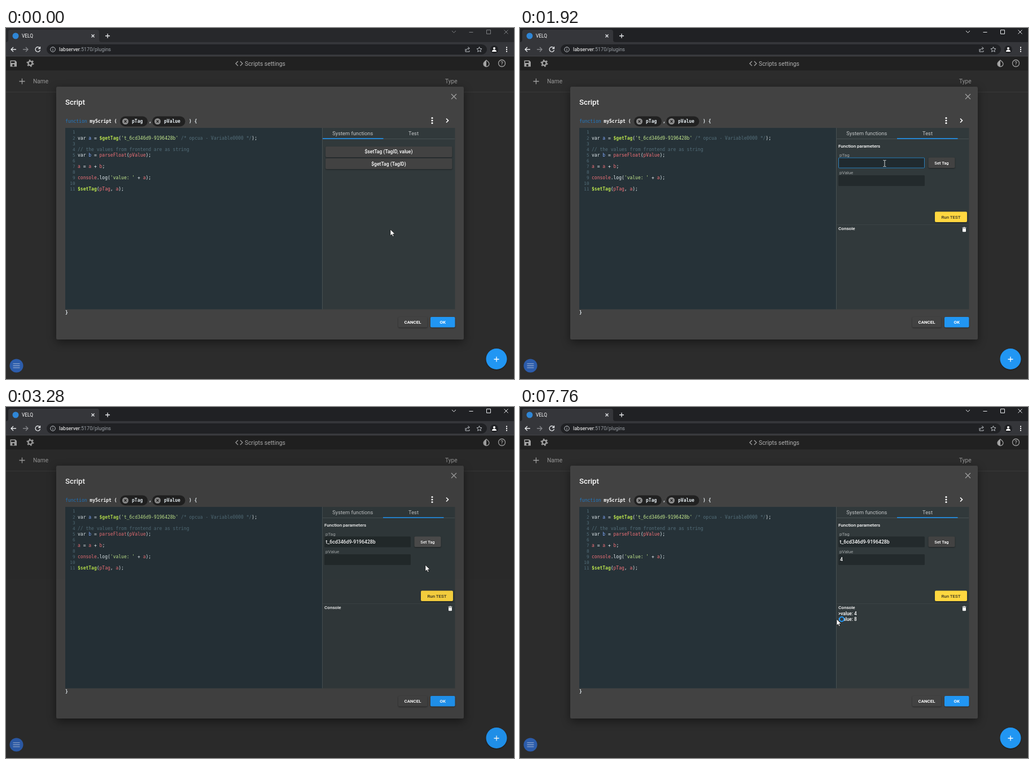
Write an HTML page that moves like this. It is 900x622 px and loops after 8 s.

```html
<!DOCTYPE html>
<html lang="en">
<head>
<meta charset="utf-8">
<title>Script editor</title>
<style>
html, body { margin: 0; width: 100%; height: 100%; overflow: hidden; background: #2c2c2c; }
svg { display: block; width: 900px; height: 622px; font: 8px Roboto, sans-serif; }
text { white-space: pre; fill: #fff; }
.m { font-weight: 500; }
.c { text-anchor: middle; }
.code text, .code { font: 8px "DejaVu Sans Mono", monospace; }
.code text { fill: #e6eef2; }
.num text { fill: #546e7a; text-anchor: end; font-size: 7.6px; }
.b { font-weight: 700; }
.fn { fill: #b9e24d; font-weight: 700; }
.str { fill: #c3e88d; }
.rem { fill: #546e7a; }
.var { fill: #f07178; }
.def { fill: #82aaff; }
.dim { fill: #a4a9aa; }
.ico { fill: none; stroke: #e8eaed; stroke-width: 1.3; }
.gray { stroke: #a0a0a0; }
.lift { filter: drop-shadow(0 1px 1px rgba(0,0,0,.4)); }
.off { opacity: 0; }

/* 1% is one 80 ms step */
.a { animation: 8s step-end -8ms infinite; }
#idle { animation-name: idle; }
#win { animation-name: win; }
#hover { animation-name: hover; }
#ink { animation-name: ink; }
#pages { animation-name: pages; }
#focus1 { animation-name: focus1; }
#focus2 { animation-name: focus2; }
#caret1 { animation-name: caret1; }
#caret2 { animation-name: caret2; }
#tag { animation-name: tag; }
#value { animation-name: value; }
#press1 { animation-name: press1; }
#press2 { animation-name: press2; }
#out1 { animation-name: out1; }
#out2 { animation-name: out2; }
#shade { animation-name: shade; }
#picker { animation-name: picker; transform-origin: 450px 316px; }
#move { animation-name: move; }
#arrow { animation-name: arrow; }
#hand { animation-name: hand; }
#beam { animation-name: beam; }
#busy { animation-name: busy; }

@keyframes idle { 0% { opacity: 1 } 9% { opacity: 0 } }
@keyframes win { 0% { opacity: .45 } 9% { opacity: 1 } }
@keyframes hover { 0% { opacity: 0 } 9% { opacity: .1 } 14% { opacity: 0 } }
@keyframes ink {
  0% { transform: none } 11% { transform: translateX(47px) }
  12% { transform: translateX(95px) } 13% { transform: translateX(107px) }
}
@keyframes pages {
  0% { transform: none } 11% { transform: translateX(-102px) }
  12% { transform: translateX(-209px) } 13% { transform: translateX(-234px) }
}
@keyframes focus1 { 0% { opacity: 0 } 21% { opacity: 1 } 31% { opacity: 0 } }
@keyframes focus2 { 0% { opacity: 0 } 49% { opacity: 1 } 70% { opacity: 0 } }
@keyframes caret1 { 0% { opacity: 0 } 21% { opacity: 1 } 24% { opacity: 0 } 27% { opacity: 1 } 30% { opacity: 0 } }
@keyframes caret2 {
  0% { opacity: 0; transform: none } 49% { opacity: 1 } 52% { opacity: 0 } 55% { opacity: 1 } 58% { opacity: 0 }
  60% { opacity: 1; transform: translateX(5.5px) } 63% { opacity: 0; transform: translateX(5.5px) }
  66% { opacity: 1; transform: translateX(5.5px) } 69% { opacity: 0; transform: none }
}
@keyframes tag { 0% { opacity: 0 } 41% { opacity: 1 } }
@keyframes value { 0% { opacity: 0 } 60% { opacity: 1 } }
@keyframes press1 { 0% { opacity: 0 } 30% { opacity: .05 } 31% { opacity: .1 } 33% { opacity: .06 } 49% { opacity: 0 } }
@keyframes press2 {
  0% { opacity: 0 } 70% { opacity: .06 } 71% { opacity: .1 } 72% { opacity: .05 } 73% { opacity: 0 }
  91% { opacity: .06 } 92% { opacity: .1 } 93% { opacity: .05 } 94% { opacity: 0 }
}
@keyframes out1 { 0% { opacity: 0 } 71% { opacity: 1 } }
@keyframes out2 { 0% { opacity: 0 } 92% { opacity: 1 } }
@keyframes shade {
  0% { opacity: 0 } 32% { opacity: .1 } 33% { opacity: .29 } 34% { opacity: .32 }
  40% { opacity: .28 } 41% { opacity: .05 } 42% { opacity: .01 } 43% { opacity: 0 }
}
@keyframes picker {
  0% { opacity: 0; transform: none } 32% { opacity: .5; transform: none }
  33% { opacity: 1; transform: scale(1.176) } 40% { opacity: .7; transform: scale(1.176) }
  41% { opacity: 0; transform: scale(1.176) }
}
@keyframes move {
  0% { transform: translate(681px, 357px) }
  1% { transform: translate(681px, 357px); animation-timing-function: steps(3) }
  4% { transform: translate(684px, 340px); animation-timing-function: steps(4) }
  8% { transform: translate(728px, 200px); animation-timing-function: steps(2) }
  10% { transform: translate(731px, 183px) }
  13% { transform: translate(731px, 183px); animation-timing-function: steps(3) }
  16% { transform: translate(676px, 235px); animation-timing-function: steps(4) }
  20% { transform: translate(646px, 240px) }
  28% { transform: translate(646px, 240px); animation-timing-function: steps(2) }
  30% { transform: translate(738px, 242px) }
  33% { transform: translate(738px, 242px); animation-timing-function: steps(4) }
  37% { transform: translate(743px, 280px) }
  44% { transform: translate(700px, 279px) }
  45% { transform: translate(649px, 275.5px) }
  47% { transform: translate(648px, 275.5px) }
  50% { transform: translate(643px, 276px) }
  57% { transform: translate(645px, 277px) }
  60% { transform: translate(645px, 278px) }
  63% { transform: translate(645px, 278px); animation-timing-function: steps(5) }
  68% { transform: translate(757px, 334px) }
  80% { transform: translate(663px, 370px); animation-timing-function: steps(3) }
  83% { transform: translate(566px, 369px) }
  85% { transform: translate(566px, 369px); animation-timing-function: steps(4) }
  89% { transform: translate(769px, 329px) }
  94% { transform: translate(769px, 329px); animation-timing-function: steps(3) }
  97%, 100% { transform: translate(561px, 376px) }
}
@keyframes arrow {
  0% { opacity: 1 } 7% { opacity: 0 } 8% { opacity: 1 } 9% { opacity: 0 } 14% { opacity: 1 } 16% { opacity: 0 }
  32% { opacity: 1 } 36% { opacity: 0 } 41% { opacity: 1 } 45% { opacity: 0 } 64% { opacity: 1 } 68% { opacity: 0 }
  80% { opacity: 1 } 89% { opacity: 0 } 95% { opacity: 1 }
}
@keyframes hand {
  0% { opacity: 0 } 7% { opacity: 1 } 8% { opacity: 0 } 9% { opacity: 1 } 14% { opacity: 0 } 30% { opacity: 1 } 32% { opacity: 0 }
  36% { opacity: 1 } 41% { opacity: 0 } 68% { opacity: 1 } 80% { opacity: 0 } 89% { opacity: 1 } 95% { opacity: 0 }
}
@keyframes beam { 0% { opacity: 0 } 16% { opacity: 1 } 30% { opacity: 0 } 45% { opacity: 1 } 64% { opacity: 0 } }
@keyframes busy { 0% { opacity: 0 } 97% { opacity: 1 } }
</style>
</head>
<body>
<svg viewBox="0 0 900 622">
  <defs>
    <clipPath id="side"><path d="M561 197h234v301h-234z"/></clipPath>
  </defs>

  <!-- browser -->
  <rect width="900" height="26" fill="#202124"/>
  <rect id="idle" class="a" width="900" height="26" fill="#27282b"/>
  <path d="M0 25q4 0 4-4V7q0-4 4-4h153q4 0 4 4v14q0 4 4 4h731v25H0z" fill="#35363a"/>
  <rect y="49.5" width="900" height="1" fill="#4a4b4e"/>
  <circle cx="17" cy="14" r="5.5" fill="#2f86d6"/>
  <text x="28" y="17" font-size="8.4">VELQ</text>
  <path class="ico" stroke-width="1.1" d="M151.500 11.500l5 5m0-5l-5 5M176 14h8m-4-4v8"/>
  <g id="win" class="a"><path class="ico" style="stroke-width:1" d="M790 5l3.500 3.500L797 5M820.500 7.500h7M851.500 3.500h7v7h-7zM882.500 3.500l7 7m0-7l-7 7"/></g>
  <rect x="72" y="29" width="780" height="18" rx="9" fill="#202124"/>
  <path class="ico" d="M18 38H9m4-4l-4 4 4 4M60 35.500a4.300 4.300 0 1 0 .5 3.500M60.500 33v3.500H57"/>
  <path class="ico" style="stroke:#85878b" d="M30 38h9m-4-4l4 4-4 4"/>
  <g class="ico" style="stroke:#bdc1c6;stroke-width:1">
    <circle cx="83" cy="38" r="4.300"/>
    <path d="M83 37.500v3M83 35v1M814 37v5h7v-2M815.500 40q0-4 5-4m-2-2.500l2.800 2.500-2.800 2.500M838.500 33.500l1.300 3 3.200.3-2.400 2.200.7 3.200-2.800-1.700-2.800 1.700.7-3.200-2.400-2.200 3.200-.3z"/>
  </g>
  <text x="94" y="41" font-size="9">labserver<tspan fill="#9aa0a6">:5170/plugins</tspan></text>
  <circle cx="865" cy="38" r="7" fill="#202124"/>
  <path fill="#fff" d="M861 42q0-3.500 4-3.500t4 3.500zM863 36a2 2 0 1 1 4 0 2 2 0 1 1-4 0M886 33.500h2v2h-2zM886 37h2v2h-2zM886 40.500h2v2h-2z"/>

  <!-- page -->
  <rect y="50.500" width="900" height="25" fill="#212121"/>
  <rect y="75.500" width="900" height="547" fill="#2c2c2c"/>
  <rect y="113" width="900" height="1" fill="#383838"/>
  <path fill="#a6a6a6" fill-rule="evenodd" d="M7.500 57.500h9l2.500 2.500v8.500H7.500zM9 59v3h6.500v-3zM11 66a2 2 0 1 0 4 0 2 2 0 1 0-4 0"/>
  <circle class="ico gray" cx="43" cy="62.500" r="3.600" style="stroke-width:2.400"/>
  <circle class="ico gray" cx="43" cy="62.500" r="5.500" style="stroke-width:2;stroke-dasharray:2.500 3.260"/>
  <path class="ico gray" d="M411 59l-4 4 4 4m4-8l4 4-4 4M28.500 89.500v10m-5-5h10"/>
  <g fill="#a6a6a6">
    <text x="423" y="66.500" font-size="10.400" style="fill:#b0b0b0">Scripts settings</text>
    <text x="48" y="98" font-size="10.200" style="fill:#999">Name</text>
    <text x="778" y="98" font-size="10.200" style="fill:#999">Type</text>
    <path d="M851 57v11q-5 0-5-5 0-2 5-6"/>
  </g>
  <path class="ico gray" d="M851 57q5 4 5 6.500a5 5 0 0 1-10 0q0-2.500 5-6.500z"/>
  <circle class="ico gray" cx="878.500" cy="62.500" r="6"/>
  <text class="c m" x="878.500" y="66" font-size="9.500" style="fill:#a6a6a6">?</text>
  <circle cx="18.500" cy="598.500" r="12" fill="#2c5cab"/>
  <path class="ico" style="stroke:#a8b9d8;stroke-width:1.200" d="M12.500 595h12m-12 3.500h12m-12 3.500h12"/>
  <circle class="lift" cx="869" cy="586.500" r="18.500" fill="#2196f3"/>
  <path class="ico" style="stroke:#fff" d="M869 582.500v9m-4.500-4.500h9"/>

  <!-- script dialog -->
  <rect x="89" y="104" width="722" height="448" rx="2.500" fill="#424242" style="filter:drop-shadow(0 5px 8px rgba(0,0,0,.45))"/>
  <text class="m" x="105" y="135.500" font-size="13.300">Script</text>
  <path class="ico gray" d="M789 117l9 9m0-9l-9 9"/>
  <g class="code">
    <text x="105" y="168"><tspan fill="#2179c4">function</tspan> <tspan class="b" fill="#fff">myScript (</tspan></text>
    <rect x="202" y="156.500" width="49" height="18" rx="9" fill="#212121"/>
    <rect x="259" y="156.500" width="58.500" height="18" rx="9" fill="#212121"/>
    <g fill="#8d8d8d"><circle cx="211.500" cy="165.500" r="5.500"/><circle cx="268.500" cy="165.500" r="5.500"/></g>
    <path class="ico" style="stroke:#212121;stroke-width:1.200" d="M209.500 163.500l4 4m0-4l-4 4M266.500 163.500l4 4m0-4l-4 4"/>
    <text class="b" style="font-weight:700" x="223" y="168">pTag</text>
    <text style="font-weight:700" x="253" y="168">,</text>
    <text style="font-weight:700" x="280" y="168">pValue</text>
    <text style="font-weight:700" x="324" y="168">) {</text>
    <text style="font-weight:700" x="105" y="507">}</text>
  </g>
  <g fill="#fff"><circle cx="755" cy="159.500" r="1.600"/><circle cx="755" cy="164" r="1.600"/><circle cx="755" cy="168.500" r="1.600"/></g>
  <path class="ico" style="stroke:#fff;stroke-width:1.700" d="M780 160.500l3.500 3.500-3.500 3.500"/>

  <rect x="105" y="177" width="455.500" height="321.500" fill="#263238"/>
  <g class="code num" id="nums"></g>
  <g class="code">
    <text x="127" y="197.500">var <tspan class="def">a</tspan> = <tspan class="fn">$getTag</tspan>(<tspan class="str">'t_6cd346d9-9196428b'</tspan> <tspan class="rem">/* opcua - Variable0000 */</tspan>);</text>
    <text x="127" y="217.700"><tspan class="rem">// the values from frontend are as string</tspan></text>
    <text x="127" y="227.800">var <tspan class="def">b</tspan> = <tspan class="var">parseFloat</tspan>(<tspan class="var">pValue</tspan>);</text>
    <text x="127" y="248"><tspan class="var">a</tspan> = <tspan class="var">a</tspan> + <tspan class="var">b</tspan>;</text>
    <text x="127" y="268.200"><tspan class="var">console</tspan>.log(<tspan class="str">'value: '</tspan> + <tspan class="var">a</tspan>);</text>
    <text x="127" y="288.400"><tspan class="fn">$setTag</tspan>(<tspan class="var">pTag</tspan>, <tspan class="var">a</tspan>);</text>
  </g>

  <!-- side panel -->
  <rect x="560.500" y="177" width="235" height="321.500" fill="#31393b"/>
  <path d="M560.500 177v321.500M561 196.500h234" stroke="#475052"/>
  <rect id="hover" class="a off" x="668.500" y="177" width="107.500" height="19" fill="#fff"/>
  <text class="c" x="614.300" y="190" font-size="9.300" style="fill:#c3c6c7">System functions</text>
  <text class="c" x="722" y="190" font-size="9.300" style="fill:#c3c6c7">Test</text>
  <rect id="ink" class="a" x="561" y="195.200" width="107.500" height="1.600" fill="#2196f3"/>
  <g clip-path="url(#side)">
    <g id="pages" class="a">
      <g class="lift" fill="#424242"><rect x="566" y="210" width="224.500" height="19" rx="2"/><rect x="566" y="231" width="224.500" height="19" rx="2"/></g>
      <text class="c m" x="678" y="222" font-size="8.600">$setTag (TagID, value)</text>
      <text class="c m" x="678" y="243.500" font-size="8.600">$getTag (TagID)</text>
      <g transform="translate(234)">
        <text class="m" x="564" y="211.500">Function parameters</text>
        <text class="dim" style="fill:#a4a9aa" x="566" y="228">pTag</text>
        <text style="fill:#a4a9aa" x="566" y="259">pValue</text>
        <g fill="#232a2c"><rect x="564" y="229.500" width="153" height="19" rx="1.500"/><rect x="564" y="261" width="153" height="19" rx="1.500"/></g>
        <g fill="#202a2f" stroke="#2c81bb">
          <rect id="focus1" class="a off" x="564.500" y="230" width="152" height="18" rx="1"/>
          <rect id="focus2" class="a off" x="564.500" y="261.500" width="152" height="18" rx="1"/>
        </g>
        <text id="tag" class="a m off" x="566.500" y="241.700" font-size="8.700">t_6cd346d9-9196428b</text>
        <text id="value" class="a m off" x="567" y="273.300" font-size="8.700">4</text>
        <g fill="#fff">
          <rect id="caret1" class="a off" x="567" y="233" width="1" height="11"/>
          <rect id="caret2" class="a off" x="567" y="265" width="1" height="10"/>
        </g>
        <rect class="lift" x="723.500" y="229.500" width="47" height="18.500" rx="2" fill="#424242"/>
        <rect id="press1" class="a off" x="723.500" y="229.500" width="47" height="18.500" rx="2" fill="#fff"/>
        <text class="c m" x="747" y="241.700" font-size="7.600">Set Tag</text>
        <rect class="lift" x="735" y="325.500" width="57" height="18.500" rx="2" fill="#ffd740"/>
        <rect id="press2" class="a off" x="735" y="325.500" width="57" height="18.500" rx="2"/>
        <text class="c m" x="763.500" y="337.700" font-size="7.900" style="fill:#3a3420">Run TEST</text>
        <path d="M561 348.500h234" stroke="#3b4345"/>
        <text class="m" x="564" y="358" font-size="8.100">Console</text>
        <path fill="#fff" d="M783.500 353.500h2l.5-.8h2l.5.8h2v1h-7zM784 355.300h6v5q0 1-1 1h-4q-1 0-1-1z"/>
        <text id="out1" class="a m off" x="564" y="369" font-size="8.200">&gt;value: 4</text>
        <text id="out2" class="a m off" x="564" y="378.800" font-size="8.200">&gt;value: 8</text>
      </g>
    </g>
  </g>
  <g class="lift"><rect x="695" y="512" width="51.500" height="18.500" rx="2" fill="#424242"/><rect x="752" y="512" width="43.500" height="18.500" rx="2" fill="#2196f3"/></g>
  <text class="c b" x="720.500" y="524" font-size="7.900">CANCEL</text>
  <text class="c b" x="773.700" y="524" font-size="7.900">OK</text>

  <rect id="shade" class="a off" y="50.500" width="900" height="572"/>

  <!-- tag picker -->
  <g id="picker" class="a off">
    <rect x="167" y="122.500" width="566" height="387" rx="2.500" fill="#424242" style="filter:drop-shadow(0 4px 7px rgba(0,0,0,.5))"/>
    <text class="m" x="182" y="149" font-size="11.200">Tag Selection</text>
    <path class="ico gray" d="M714.500 133.500l7 7m0-7l-7 7"/>
    <path class="ico" style="stroke-width:1.100" d="M192.500 173.500l7 7m0-7l-7 7"/>
    <path fill="#333" d="M213 177h118v11H213zM340 177h211v11H340zM560 177h119v11H560z"/>
    <g font-size="7.400" class="m" id="rows"></g>
    <g font-size="7"><text x="188" y="469">Items per page:</text><text x="241" y="469" class="m">25</text><text x="294" y="469">1 - 7 of 7</text></g>
    <path d="M265 466h6l-3 3z" fill="#ccc"/>
    <path class="ico gray" style="stroke-width:1" d="M241 473.500h32M353.500 464.500l-3 3 3 3M373.500 464.500l3 3-3 3"/>
    <g class="lift"><rect x="634" y="475" width="43" height="15.500" rx="2" fill="#424242"/><rect x="682" y="475" width="37" height="15.500" rx="2" fill="#2196f3"/></g>
    <text class="c b" x="655" y="485" font-size="6.700">CANCEL</text>
    <text class="c b" x="700.500" y="485" font-size="6.700">OK</text>
  </g>

  <!-- pointer -->
  <g id="move" class="a">
    <path id="arrow" class="a" d="M0 0v11l2.600-2.300 1.700 3.800 1.800-.8-1.700-3.700H8z" fill="#fff" stroke="#000" stroke-width=".6"/>
    <path id="hand" class="a off" d="M-1 1Q0-1 1 1V5l4.500 1q1.500.5 1.300 2L6 12.500H.8L-3.500 7.500Q-3 5.800-1 7.300z" fill="#fff" stroke="#000" stroke-width=".6"/>
    <path id="beam" class="a off" d="M-2.500-5.500h1.800l.7.700.7-.7h1.800M0-5V5M-2.500 5.500h1.800l.7-.7.7.7h1.800" fill="none" stroke="#d5d9da"/>
    <circle id="busy" class="a off" cx="9" cy="0" r="4" fill="#31393b" stroke="#2196f3" stroke-width="2"/>
  </g>
</svg>
<script>
const text = (x, y, s) => `<text x="${x}" y="${y}">${s}</text>`;
const fill = (id, html) => { document.getElementById(id).innerHTML = html; };

fill("nums", Array.from({ length: 11 }, (_, i) => text(122.5, 187.4 + i * 10.1, i + 1)).join(""));

const node = s => "ns=2;s=Demo." + s;
const tags = [
  ["tagA", "DB2.DBW1", "k3"],
  ["Float", "1", "modbus"],
  ...["String", "Byte"].map(n => [n, node("Static.Scalar." + n), "opcua"]),
  ...[0, 1, 2].map(i => ["Variable000" + i, node("Massfolder_Static.Variable000" + i), "opcua"])
];
const cols = [213, 340, 560];
const row = (cells, y) => cells.map((s, i) => text(cols[i], y, s)).join("");
fill("rows", row(["Name", "Address", "Device"], 170.5) + tags.map((cells, i) => {
  const y = 202 + i * 19.7;
  return row(cells, y + 2.2) +
    `<path class="ico" style="stroke-width:1" d="M191.500 ${y - 4}h8.500v8.500h-8.500z"/>` +
    `<path class="ico" d="M694.500 ${y + 1}l3 3 6.500-7"/>`;
}).join(""));
</script>
</body>
</html>
```
